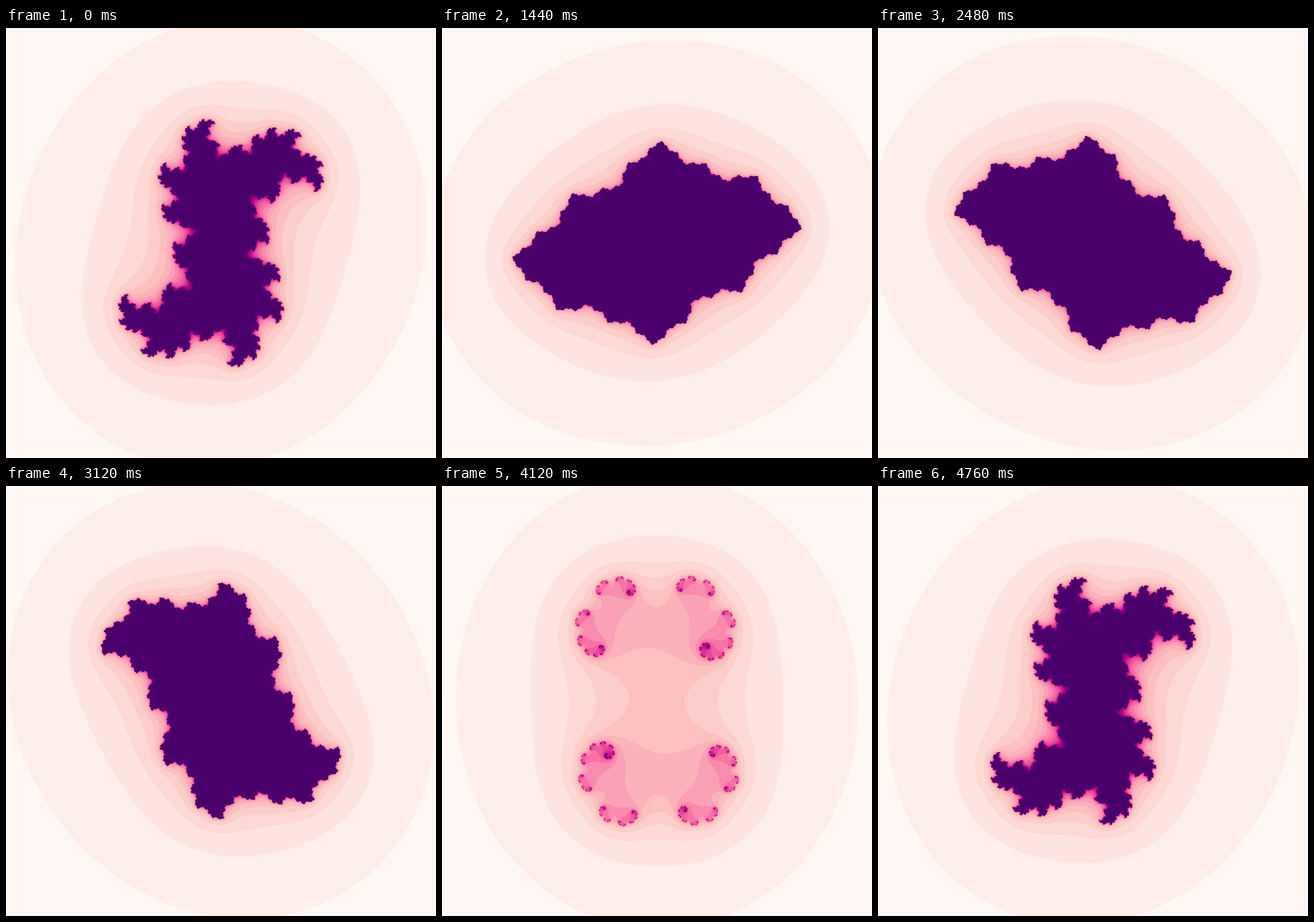
Write an HTML page with a canvas that moves like this. It is 748 by 748 pixels and loops after 4800 ms.

```html
<!DOCTYPE html>
<html lang="en">
<head>
<meta charset="utf-8">
<title>Julia set</title>
<style>
  html, body { margin: 0; width: 100%; height: 100%; overflow: hidden; background: #fff7f3; }
  canvas { display: block; width: 100vw; height: 100vh; }
</style>
</head>
<body>
<canvas id="stage" width="748" height="748"></canvas>
<script>
const SIZE = 748, UNIT = SIZE / 4;
const STEP = 40, STEPS = 120;
const RADIUS = 0.5, START = Math.PI / 4;
const LIMIT = 20, ESCAPE = 16;

const stops = ['fff7f3', 'fde0dd', 'fcc5c0', 'fa9fb5', 'f768a1', 'dd3497', 'ae017e', '7a0177', '49006a']
  .map(hex => [0, 2, 4].map(i => parseInt(hex.slice(i, i + 2), 16)));

// One packed ABGR colour per escape count
const palette = Uint32Array.from({ length: LIMIT }, (_, level) => {
  const shade = Math.min(255, Math.floor(level / (LIMIT - 1) * 256)) / 255;
  const pos = shade * (stops.length - 1);
  const i = Math.min(stops.length - 2, Math.floor(pos));
  const [r, g, b] = stops[i].map((v, k) => Math.round(v + (stops[i + 1][k] - v) * (pos - i)));
  return (255 << 24 | b << 16 | g << 8 | r) >>> 0;
});

const ctx = document.getElementById('stage').getContext('2d');
const image = ctx.createImageData(SIZE, SIZE);
const pixels = new Uint32Array(image.data.buffer);

function escapeLevel(x, y, cx, cy) {
  let xx = x * x, yy = y * y;
  for (let i = 0; i < LIMIT; i++) {
    y = 2 * x * y + cy;
    x = xx - yy + cx;
    xx = x * x;
    yy = y * y;
    if (xx + yy > ESCAPE) return i;
  }
  return LIMIT - 1;
}

function draw(step) {
  const angle = START + 2 * Math.PI * step / (STEPS - 1);
  const cx = RADIUS * Math.cos(angle), cy = RADIUS * Math.sin(angle);
  const last = SIZE * SIZE - 1;
  let p = 0;
  // The set is symmetric about its centre, so half the rows are enough
  for (let row = 0; row < SIZE / 2; row++) {
    const y = (row + 0.5) / UNIT - 2;
    for (let col = 0; col < SIZE; col++, p++) {
      const x = (col + 0.5) / UNIT - 2;
      pixels[p] = pixels[last - p] = palette[escapeLevel(x, y, cx, cy)];
    }
  }
  ctx.putImageData(image, 0, 0);
}

let shown = -1;
function tick() {
  const step = Math.floor(performance.now() / STEP) % STEPS;
  if (step !== shown) draw(shown = step);
  requestAnimationFrame(tick);
}
tick();
</script>
</body>
</html>
```
